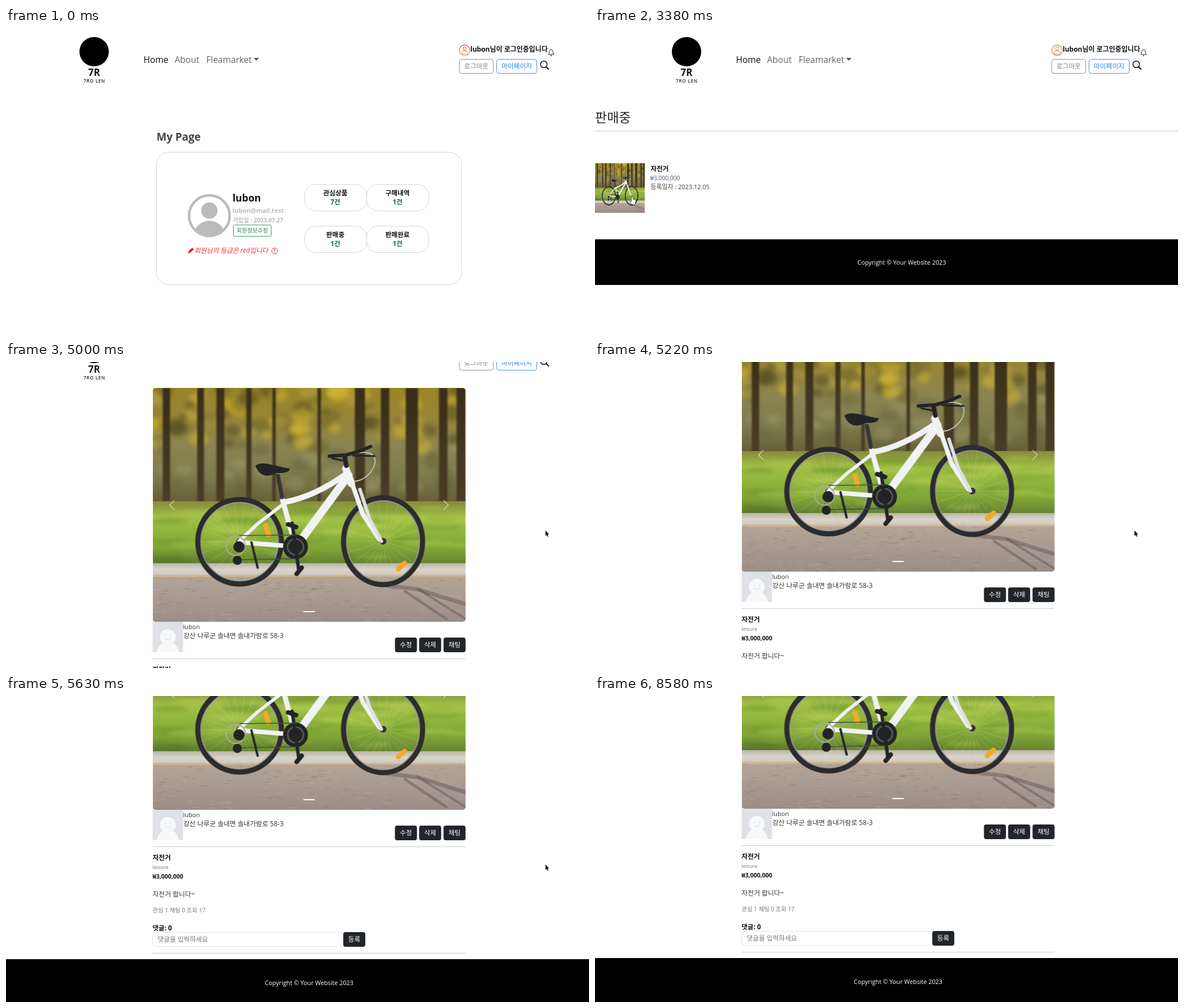
An HTML page with a canvas that plays this animation: 1032 by 543 pixels, repeating every 8.92 s.

```html
<!DOCTYPE html>
<html lang="ko">
<head>
<meta charset="utf-8">
<title>My Page</title>
<style>
html, body { margin: 0; width: 100%; height: 100%; overflow: hidden; background: #fff; }
canvas { display: block; width: 100vw; height: 100vh; }
</style>
</head>
<body>
<canvas id="stage" width="1032" height="543"></canvas>
<script>
const W = 1032, H = 543, LOOP = 8920;
const FONT = '"Open Sans", "Noto Sans CJK KR", "Noto Sans CJK", sans-serif';
const INK = '#212529';
const USER = 'lubon';
let g = document.getElementById('stage').getContext('2d');

// y is the optical middle of the line
function text(s, x, y, size, color, style = '', align = 'left') {
  g.font = `${style} ${size}px ${FONT}`;
  g.fillStyle = color;
  g.textAlign = align;
  g.fillText(s, x, y + size * 0.36);
}

function rect(x, y, w, h, color) {
  g.fillStyle = color;
  g.fillRect(x, y, w, h);
}

function round(x, y, w, h, r, stroke, fill) {
  g.beginPath();
  g.roundRect(x, y, w, h, r);
  if (fill) { g.fillStyle = fill; g.fill(); }
  if (stroke) { g.strokeStyle = stroke; g.lineWidth = 1; g.stroke(); }
}

function disc(x, y, rx, color, ry = rx) {
  g.beginPath();
  g.ellipse(x, y, rx, ry, 0, 0, 7);
  g.fillStyle = color;
  g.fill();
}

function ring(x, y, rx, color, width = 1, ry = rx) {
  g.beginPath();
  g.ellipse(x, y, rx, ry, 0, 0, 7);
  g.strokeStyle = color;
  g.lineWidth = width;
  g.stroke();
}

function line(color, width, ...p) {
  g.beginPath();
  for (let i = 0; i < p.length; i += 2) g.lineTo(p[i], p[i + 1]);
  g.strokeStyle = color;
  g.lineWidth = width;
  g.stroke();
}

function fade(y0, y1, ...colors) {
  const grad = g.createLinearGradient(0, y0, 0, y1);
  colors.forEach((c, i) => grad.addColorStop(i / (colors.length - 1), c));
  return grad;
}

function random(seed) {
  return () => (seed = (seed * 16807) % 2147483647) / 2147483647;
}

function drawWheel(x, y, rx, ry) {
  for (let i = 0; i < 22; i++) {
    const a = i * Math.PI / 11;
    line('rgba(225,225,215,.35)', 0.7, x, y, x + rx * 0.9 * Math.cos(a), y + ry * 0.9 * Math.sin(a));
  }
  ring(x, y, rx - 10, '#9a9a95', 2.5, ry - 10);
  ring(x, y, rx - 5, '#2b2c2e', 9, ry - 5);
  disc(x, y, 6, '#333');
}

function drawScene() {
  const rnd = random(77);
  // soft seeded patches between two heights
  const mottle = (n, y0, y1, rx, ry, alpha, colors) => {
    g.globalAlpha = alpha;
    for (let i = 0; i < n; i++) {
      const k = 0.5 + rnd();
      disc(rnd() * 554, y0 + rnd() * (y1 - y0), rx * k, colors[i % colors.length], ry * k);
    }
    g.globalAlpha = 1;
  };

  rect(0, 0, 554, 210, fade(0, 210, '#9a8526', '#988638', '#8b8552', '#7d7a4c', '#625c32'));
  g.filter = 'blur(4px)';
  mottle(90, 0, 105, 13, 10, 0.5, ['#d9b92e', '#4d481c', '#c2ac4a', '#6d6224']);
  mottle(30, 105, 185, 14, 9, 0.35, ['#a5a277', '#5d5a35']);
  g.filter = 'blur(1.5px)';
  [[18, 13], [79, 12], [113, 14], [166, 9], [212, 6], [292, 6], [358, 18], [404, 15], [448, 22], [507, 15], [538, 16]]
    .forEach(([x, w]) => rect(x, 0, w, 203, fade(0, 203, '#372e18', '#40351f', '#4a3c25')));
  g.filter = 'none';

  rect(0, 201, 554, 114, fade(201, 315, '#848a3c', '#a2c046', '#8fb53c', '#7fa436', '#647f30'));
  g.filter = 'blur(3px)';
  mottle(50, 212, 300, 34, 4, 0.35, ['#bcd45a', '#66902c']);
  mottle(16, 300, 314, 40, 3, 0.4, ['#526f28', '#7c9c3c']);
  g.filter = 'none';
  rect(0, 311, 554, 22, fade(311, 333, '#b9b4a4', '#d9d4cb', '#cfc8bd'));
  rect(0, 332, 554, 83, fade(332, 415, '#b5a596', '#a89a91', '#9c8e87'));
  mottle(220, 336, 415, 5, 1, 0.25, ['#c3b5ab', '#82746f']);
  line('#d2b58d', 3, 0, 334, 554, 333);

  g.lineCap = g.lineJoin = 'round';
  const shade = 'rgba(85,72,72,.4)';
  line(shade, 7, 400, 349, 468, 357, 554, 384);
  line(shade, 5, 447, 361, 520, 410);
  line(shade, 4, 470, 357, 554, 410);

  drawWheel(154, 273, 79, 80);
  drawWheel(408, 272, 75, 82);
  line('#f3a927', 9, 200, 244, 205, 260);
  line('#f3a927', 9, 435, 321, 446, 311);

  // cables, frame, fork
  g.beginPath();
  g.moveTo(348, 120);
  g.bezierCurveTo(420, 95, 395, 165, 355, 166);
  g.strokeStyle = '#d8d8d2';
  g.lineWidth = 1.5;
  g.stroke();
  const paint = '#f1f2f4';
  line(paint, 6, 234, 204, 185, 242, 153, 272);
  line(paint, 8, 156, 274, 246, 281);
  line(paint, 9, 230, 199, 251, 274);
  g.beginPath();
  g.moveTo(232, 203);
  g.quadraticCurveTo(288, 193, 346, 150);
  g.strokeStyle = paint;
  g.lineWidth = 10;
  g.stroke();
  line(paint, 14, 347, 155, 264, 268);
  line(paint, 13, 342, 143, 352, 170);
  line(paint, 8, 354, 172, 372, 224, 401, 268);
  line('#dfe1e2', 6, 367, 180, 384, 232, 405, 272);

  // saddle, bars, drivetrain
  const dark = '#222426';
  line('#34363a', 7, 222, 156, 229, 194);
  g.beginPath();
  g.moveTo(182, 138);
  g.bezierCurveTo(192, 128, 218, 139, 243, 143);
  g.quadraticCurveTo(242, 152, 220, 151);
  g.quadraticCurveTo(192, 165, 182, 138);
  g.fillStyle = dark;
  g.fill();
  line(dark, 6, 313, 121, 343, 119, 364, 113, 386, 104);
  line(dark, 8, 340, 122, 343, 138);
  line(dark, 3, 355, 120, 393, 121);
  line(dark, 3, 318, 125, 342, 130);
  disc(253, 282, 22, dark);
  ring(253, 282, 14, '#555', 3);
  line(dark, 6, 247, 240, 253, 282, 259, 325);
  line(dark, 8, 240, 242, 254, 247);
  line(dark, 8, 255, 330, 264, 319);
  line('#4a4a48', 1.5, 150, 305, 253, 303);
  line('#4a4a48', 1.5, 154, 262, 253, 261);
  ring(147, 280, 17, '#aaa', 2);
  disc(153, 282, 10, dark);
  disc(150, 306, 8, dark);
  line(dark, 4, 175, 274, 186, 319);
}

function makePhoto() {
  const c = document.createElement('canvas');
  c.width = 554;
  c.height = 415;
  const main = g;
  g = c.getContext('2d');
  drawScene();
  g = main;
  return c;
}
const photo = makePhoto();

function drawHeader(dx, badge) {
  g.save();
  g.translate(dx, 0);
  disc(156, 42, 26, '#000');
  text('7R', 156, 79, 17, '#111', 'bold', 'center');
  g.letterSpacing = '0.8px';
  text('7RO LEN', 156.5, 94, 8, '#222', '600', 'center');
  g.letterSpacing = '0px';

  text('Home', 243.5, 56, 15.5, '#111');
  text('About', 298.5, 56, 15.5, '#666');
  text('Fleamarket', 354.5, 56, 15.5, '#666');
  g.beginPath();
  g.moveTo(438.5, 53);
  g.lineTo(448, 53);
  g.lineTo(443.2, 58);
  g.fillStyle = '#555';
  g.fill();

  ring(812, 39.5, 9.3, badge, 1.2);
  ring(812, 36.5, 3, badge, 1);
  g.beginPath();
  g.arc(812, 46.5, 6, Math.PI, 0);
  g.closePath();
  g.stroke();
  text(USER + '님이 로그인중입니다', 822, 38, 12, '#111', 'bold');

  g.beginPath();
  g.moveTo(960, 47);
  g.quadraticCurveTo(962, 45, 962, 42);
  g.bezierCurveTo(962, 37, 968, 37, 968, 42);
  g.quadraticCurveTo(968, 45, 970, 47);
  g.closePath();
  g.strokeStyle = '#222';
  g.lineWidth = 1;
  g.stroke();
  line('#222', 1.5, 964, 49, 966, 49);

  round(802.5, 55.5, 60, 25, 4, '#8b9096');
  text('로그아웃', 832.5, 68, 11.7, '#7c838a', '', 'center');
  round(868.5, 55.5, 71, 25, 4, '#4a90e8');
  text('마이페이지', 904, 68, 11.7, '#2f80ea', '', 'center');
  ring(952, 64.5, 5.8, '#111', 1.5);
  line('#111', 2, 956.3, 69, 961, 73.8);
  g.restore();
}

function drawTile(x, y, label, count) {
  round(x + 0.5, y + 0.5, 110, 47, 20, '#d5d5d5');
  text(label, x + 55, y + 15.5, 11.7, '#111', 'bold', 'center');
  text(count, x + 55, y + 31.5, 11.5, '#17633f', 'bold', 'center');
}

function drawProfile() {
  drawHeader(0, fade(30, 49, '#c9463f', '#eaa24a'));
  text('My Page', 266.5, 193, 18.8, '#444', 'bold');
  round(266.5, 220.5, 540, 235, 22, '#d5d5d5');

  const gray = '#bbb';
  g.save();
  g.beginPath();
  g.arc(360, 333, 36, 0, 7);
  g.clip();
  disc(360, 324, 14.5, gray);
  disc(360, 372, 29, gray, 30);
  g.restore();
  ring(360, 333, 36, gray, 4.5);

  text(USER, 401, 302, 17.5, '#111', 'bold');
  text(USER + '@mail.test', 401, 324, 11.1, gray, 'bold');
  text('가입일 : 2023.07.27', 402, 341.5, 10.2, gray, 'bold');
  round(402.5, 349.5, 67, 20, 2, '#3f9a70');
  text('회원정보수정', 436, 359.5, 10.1, '#2f7f5a', '', 'center');

  line('#e8101c', 4, 324.5, 397.5, 331, 391.5);
  line('#e8101c', 2, 322.5, 399.5, 325, 397);
  text('회원님의 등급은 red입니다', 333.5, 395, 11.7, '#f0303a', 'italic');
  ring(475.5, 395.5, 5.2, '#e8303a', 1);
  text('?', 475.5, 395.5, 8, '#e8303a', 'bold', 'center');

  drawTile(528, 277, '관심상품', '7건');
  drawTile(638, 277, '구매내역', '1건');
  drawTile(528, 351, '판매중', '1건');
  drawTile(638, 351, '판매완료', '1건');
}

function drawSales() {
  drawHeader(6, '#bd8b3a');
  text('판매중', 0, 159, 23, INK);
  rect(0, 182, W, 1.3, '#d3d3d3');
  g.drawImage(photo, 0, 240, 88, 88);
  text('자전거', 98.5, 249.5, 11.6, '#111', 'bold');
  text('₩3,000,000', 98, 266.5, 10.4, '#4b5a68');
  text('등록일자 : 2023.12.05', 98.5, 282.5, 10.9, '#444');
  rect(0, 375, W, 81, '#000');
  text('Copyright © Your Website 2023', 543, 416, 10.8, '#fff', '', 'center');
}

function button(label, x, y, fill = INK) {
  round(x, y, 39, 26, 4, null, fill);
  text(label, x + 19.5, y + 13, 11.6, '#fff', '', 'center');
}

function chevron(x, dir) {
  line('rgba(255,255,255,.6)', 1.3, x - 4 * dir, 311.5, x + 4.5 * dir, 320, x - 4 * dir, 328.5);
}

function drawItem(scroll, hover) {
  g.save();
  g.translate(0, -scroll);
  drawHeader(0, '#d07a42');

  g.save();
  g.beginPath();
  g.roundRect(259.5, 112, 554, 415, 5);
  g.clip();
  g.drawImage(photo, 259.5, 112);
  g.restore();
  chevron(294, -1);
  chevron(778.5, 1);
  rect(526.5, 508, 20, 2, '#fff');

  g.save();
  g.beginPath();
  g.rect(259.5, 527, 54, 54);
  g.clip();
  rect(259, 527, 55, 54, '#dfe1e6');
  disc(286.5, 585, 20, '#f7f8f9', 23);
  disc(286.5, 554, 14, '#f7f8f9');
  disc(282, 551, 1, '#d3d6db');
  disc(291, 551, 1, '#d3d6db');
  g.beginPath();
  g.arc(286.5, 554, 5, 0.3, 2.84);
  g.strokeStyle = '#d3d6db';
  g.lineWidth = 1;
  g.stroke();
  g.restore();

  text(USER, 313.5, 536, 11, '#333');
  text('강산 나루군 솔내면 솔내가람로 58-3', 314, 552, 11.8, '#333');
  button('수정', 688.5, 555);
  button('삭제', 731.3, 555);
  button('채팅', 774.5, 555, hover ? '#424649' : INK);
  rect(259.5, 592, 554, 1, '#ccc');

  text('자전거', 259.5, 612, 11.7, '#111', 'bold');
  text('leisure', 259.5, 629, 9, '#777');
  text('₩3,000,000', 259.5, 645, 10.5, '#111', 'bold');
  text('자전거 팝니다~', 259.5, 677, 11.8, '#333');
  text('관심 1 채팅 0 조회 17', 259.5, 705, 10.3, '#777');
  text('댓글: 0', 259.5, 736.5, 11.5, '#111', 'bold');
  round(259.5, 744.5, 342, 25, 4, '#dee2e6');
  text('댓글을 입력하세요', 268.5, 757, 11.7, '#777');
  button('등록', 597, 744);
  rect(259.5, 781, 554, 1, '#ccc');

  rect(0, 792, W, 90, '#000');
  text('Copyright © Your Website 2023', 536.5, 834, 10.8, '#fff', '', 'center');
  g.restore();
}

function shape(x, y, points, fill, stroke) {
  g.beginPath();
  for (let i = 0; i < points.length; i += 2) g.lineTo(x + points[i], y + points[i + 1]);
  g.closePath();
  g.lineJoin = 'round';
  g.lineWidth = 1;
  g.strokeStyle = stroke;
  g.stroke();
  g.fillStyle = fill;
  g.fill();
}

const ARROW = [0, 0, 0, 9.5, 2, 7.8, 3.6, 11, 5, 10.3, 3.6, 7.2, 6.2, 7];
const HAND = [-1, 0, 0.6, 0, 0.9, 4, 5, 5, 6, 6.4, 5.2, 10, 4.4, 13, -0.8, 13, -3.6, 8.4, -3.4, 7, -1.1, 8.2];

// start, step length, step count, from x, y, to x, y
const MOVES = [
  [390, 69.2, 13, 910, 552, 578, 375],
  [1290, 70, 1, 578, 375, 580, 378],
  [2620, 69.1, 12, 580, 378, 66, 300],
  [3910, 68.9, 10, 66, 300, 955, 299],
  [6100, 68.6, 8, 955, 299, 794, 244],
  [7570, 76.2, 8, 794, 244, 975, 57],
  [8380, 66.7, 3, 1028, 478, 1020, 533]
];

function pointer(t) {
  const hidden = t < 390 || (t >= 8180 && t < 8380) || t >= 8580;
  if (hidden) return null;
  const [t0, dt, n, x0, y0, x1, y1] = MOVES.filter(m => t >= m[0]).pop();
  const u = Math.min(n, Math.floor((t - t0) / dt) + 1) / n;
  const e = u * u * (3 - 2 * u);
  return { x: x0 + (x1 - x0) * e, y: y0 + (y1 - y0) * e };
}

// step number, page offset
const SCROLL = [[0, 10], [2, 66], [7, 215], [11, 325], [12, 327]];

function scrollAt(t) {
  if (t < 4860) return 0;
  const step = Math.floor((t - 4848) / 70);
  const i = SCROLL.findIndex(k => k[0] > step);
  if (i < 0) return 327;
  const [a, p] = SCROLL[i - 1], [b, q] = SCROLL[i];
  return Math.round(p + (q - p) * (step - a) / (b - a));
}

function draw(t) {
  rect(0, 0, W, H, '#fff');
  const p = pointer(t);
  const page = t < 2020 ? 0 : t < 3840 ? 1 : 2;
  const onChat = page === 2 && p && p.x > 774 && p.x < 813 && p.y > 228 && p.y < 254;
  if (page === 0) drawProfile();
  else if (page === 1) drawSales();
  else drawItem(scrollAt(t), onChat);

  if (!p) return;
  const click = (t >= 1820 && t < 1950) || (t >= 3710 && t < 3840);
  if (click) disc(p.x - 1, p.y + 2, 9.5, 'rgba(255,244,40,.75)');
  const hand = onChat || (page === 0 && t >= 1290) || (page === 1 && p.x < 88);
  if (hand) shape(p.x, p.y, HAND, '#fff', '#222');
  else shape(p.x, p.y, ARROW, '#000', '#fff');
}

const start = performance.now();
function tick() {
  draw((performance.now() - start) % LOOP);
  requestAnimationFrame(tick);
}
tick();
</script>
</body>
</html>
```
